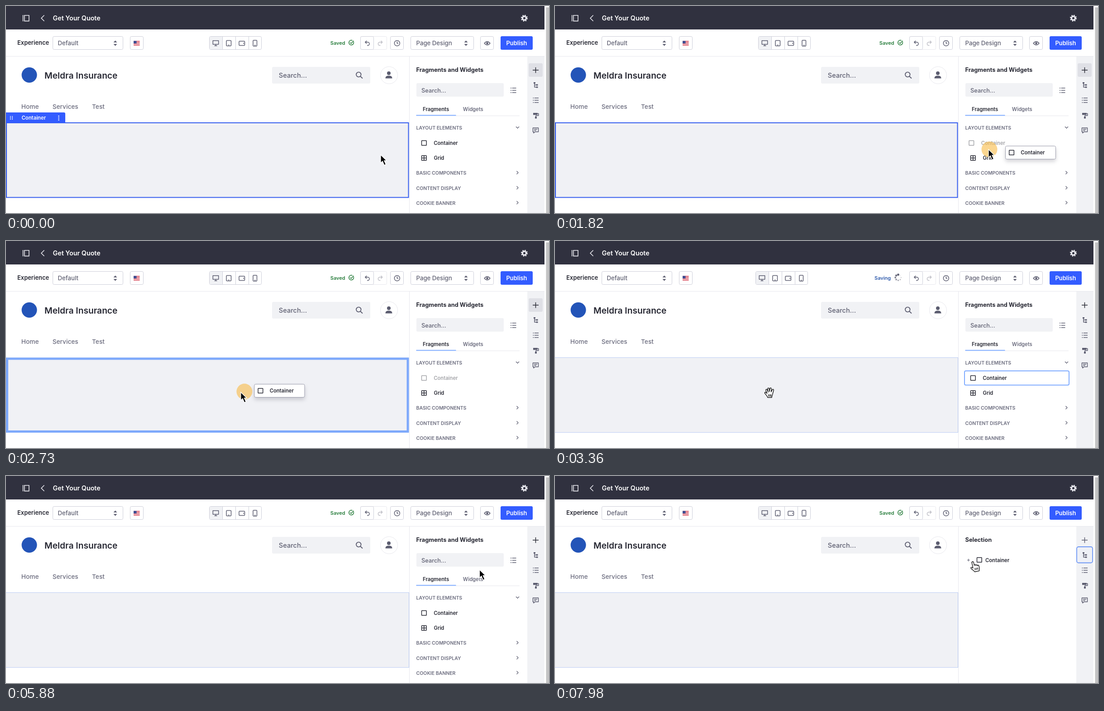
An HTML page that plays this animation: 1200x459 px, repeating every 8000 ms.

```html
<!DOCTYPE html>
<html lang="en">
<head>
<meta charset="utf-8">
<title>Page editor</title>
<style>
html, body { margin: 0; width: 100%; height: 100%; overflow: hidden; background: #fff; }
svg { display: block; }
text { font: 600 11.2px Inter, "Open Sans", sans-serif; fill: #272833; white-space: pre; }
.t13 { font-size: 12.9px; }
.reg { font-size: 13.2px; font-weight: 450; fill: #5f6072; }
.nav { font-size: 13.7px; font-weight: 500; fill: #6b6c7e; }
.cap { font-size: 10.5px; fill: #6b6c7e; }
.bold { font-size: 12.8px; font-weight: 700; }
.box { fill: #fff; stroke: #cdced9; }
.ln { fill: none; stroke: #5c5d70; stroke-width: 1.5; stroke-linejoin: round; }
.dk { stroke: #272833; }
.rule { fill: none; stroke: #e7e7ed; }
.gray { fill: #5c5d70; }
.soft { fill: #f1f2f5; }
.ptr { fill: #fff; stroke: #111; stroke-width: 1.4; stroke-linejoin: round; }
#chip rect:first-child { filter: drop-shadow(0 5px 4px rgba(40, 40, 60, .2)); }
</style>
</head>
<body>
<svg width="1200" height="459" viewBox="0 0 1200 459">
<defs>
  <path id="sort" class="gray" d="M-4-1.8H4L0-6ZM-4 1.8H4L0 6Z"/>
  <path id="chev" class="ln" d="M-2-3.5L1.5 0L-2 3.5" style="stroke-width:1.2"/>
  <path id="list" class="ln" d="M-6-5h2M-6 0h2M-6 5h2M-2.5-5h9M-2.5 0h9M-2.5 5h9"/>
  <rect id="square" class="ln dk" x="-5.3" y="-5.3" width="10.6" height="10.6" rx=".8"/>
</defs>

<!-- header -->
<rect width="1190" height="52" fill="#30313f"/>
<g fill="none" stroke="#e7e7ed" stroke-width="1.6">
  <path d="M37.6 20V34M40.8 20.8H50.8V33.4H40.8Z"/>
  <path d="M84.5 20.5L78 27L84.5 33.5"/>
</g>
<text x="103.5" y="32" style="font-size:14.3px;fill:#fff">Get Your Quote</text>
<g fill="none" stroke="#e7e7ed" transform="translate(1145.5 27)">
  <circle r="4.1" stroke-width="3.2"/>
  <circle r="6.2" stroke-width="2.8" stroke-dasharray="2.435"/>
</g>

<!-- toolbar -->
<path class="rule" d="M0 111.5H1190"/>
<text class="t13" x="25" y="86">Experience</text>
<rect class="box" x="103.5" y="67.5" width="155" height="29" rx="3"/>
<text class="reg" x="114.5" y="87">Default</text>
<use href="#sort" x="241.5" y="82.5"/>
<rect class="box" x="274.5" y="67.5" width="29" height="29" rx="3"/>
<g transform="translate(282 77.5)">
  <rect width="13.5" height="10" fill="#f6f2f4"/>
  <path d="M0 .7H13.5M0 3.5H13.5M0 6.4H13.5M0 9.3H13.5" stroke="#d8384a" stroke-width="1.4"/>
  <rect width="6.5" height="5.4" fill="#3a4c92"/>
</g>
<g id="devices">
  <rect class="box" x="449.5" y="67.5" width="115" height="29" rx="3"/>
  <rect class="soft" x="450" y="68" width="28" height="28" rx="2.5"/>
  <path d="M478.5 68V96M507.5 68V96M536.5 68V96" stroke="#cdced9"/>
  <path class="ln" d="M457.3 76.8H469.7V85H457.3ZM460.5 88.3H466.5M463.5 85V88"/>
  <rect class="ln" x="487" y="76.5" width="10.5" height="12" rx="1.5"/>
  <rect class="ln" x="515" y="78" width="12.5" height="9.5" rx="1.5"/>
  <rect class="ln" x="546" y="76" width="8.5" height="13" rx="1.5"/>
  <path class="ln" d="M491 86.4H493.6M525.2 81.5V84M549 87H551.5"/>
</g>
<g data-on="0-3010 3710-8000">
  <text x="716.8" y="86" style="font-size:11px;fill:#287d3c">Saved</text>
  <path class="ln" d="M768 79.3A5.3 5.3 0 1 1 765.5 76.5M760.3 81L762.6 83.2L768.3 77" style="stroke:#287d3c"/>
</g>
<g data-on="3010-3710">
  <text x="706" y="86" style="font-size:11px;fill:#2e5aac">Saving</text>
  <g id="spin" class="gray" transform="translate(758.5 81)"></g>
</g>
<rect class="box" x="783.5" y="67.5" width="58" height="29" rx="3" style="stroke:#e7e7ed"/>
<rect class="box" x="783.5" y="67.5" width="29" height="29" rx="3"/>
<path id="undo" class="ln" d="M797 77L793.8 80.2L797 83.4M794.3 80.2H799.5A3.6 3.6 0 0 1 799.5 87.4H798"/>
<path class="ln" opacity=".4" d="M828.5 77L831.7 80.2L828.5 83.4M831.2 80.2H826A3.6 3.6 0 0 0 826 87.4H827.5"/>
<rect class="box" x="849.5" y="67.5" width="29" height="29" rx="3"/>
<circle class="ln" cx="864.3" cy="82.5" r="6"/>
<path class="ln" d="M864.3 78.8V82.8H867"/>
<rect class="box" x="894.5" y="67.5" width="139" height="29" rx="3"/>
<text class="reg" x="906.5" y="87">Page Design</text>
<use href="#sort" x="1016.5" y="82.5"/>
<rect class="box" x="1048.5" y="67.5" width="29" height="29" rx="3"/>
<path class="ln" d="M1057.2 82.7Q1063.5 75 1069.8 82.7Q1063.5 90.4 1057.2 82.7Z"/>
<circle class="gray" cx="1063.5" cy="82.7" r="2.4"/>
<rect x="1093" y="67" width="71" height="30" rx="3" fill="#335cff"/>
<text class="t13" x="1105.5" y="87" style="fill:#fff">Publish</text>

<!-- page -->
<circle cx="51.5" cy="153" r="17" fill="#2354b8"/>
<text x="85" y="161" style="font-size:19.2px">Meldra Insurance</text>
<rect class="soft" x="588" y="135" width="217" height="37" rx="3"/>
<text class="reg" x="602.8" y="159" style="font-size:14.6px">Search...</text>
<g class="ln" style="stroke-width:1.8"><circle cx="779.3" cy="152" r="5.3"/><path d="M783.2 156L788 160.5"/></g>
<circle class="rule" cx="846.5" cy="153.5" r="19"/>
<circle class="gray" cx="846" cy="149" r="4"/>
<path class="gray" d="M838.5 160.5C838.5 156 841.5 154.5 846 154.5S853.5 156 853.5 160.5Z"/>
<text class="nav" x="33.8" y="228">Home</text>
<text class="nav" x="102.7" y="228">Services</text>
<text class="nav" x="190" y="228">Test</text>
<rect x="0" y="258" width="890" height="167" fill="#f0f1f5"/>
<g fill="none">
  <rect data-on="0-1960" x="1" y="259" width="888.5" height="165.5" stroke="#355dee" stroke-width="2"/>
  <rect data-on="1960-2940" x="2.5" y="261" width="885.5" height="161.5" stroke="#7ea9fb" stroke-width="5"/>
  <rect data-on="2940-4970 5600-8000" x="-.5" y="258.5" width="891" height="166" stroke="#bccdf4"/>
  <rect data-on="4970-5600" x=".8" y="259" width="889" height="165.4" stroke="#80acff" stroke-width="1.7"/>
</g>
<g data-on="0-1750">
  <path d="M0 236H128Q131 236 131 239V259H0Z" fill="#335cff"/>
  <path d="M9.8 244v8M14 244v8" stroke="#fff" stroke-width="1.8" stroke-dasharray="1.8 1.3"/>
  <text x="34.5" y="252" style="font-size:11.3px;fill:#fff">Container</text>
  <path d="M116.5 243v11" stroke="#fff" stroke-width="2.3" stroke-dasharray="2.3 1.9"/>
</g>

<!-- side panel -->
<path class="rule" d="M891.5 112V459"/>
<g data-on="0-6510">
  <text class="bold" x="906.5" y="146">Fragments and Widgets</text>
  <rect class="soft" x="907" y="171" width="193" height="30" rx="3"/>
  <text class="reg" x="918" y="191.5" style="font-size:12.8px">Search...</text>
  <use href="#list" x="1121" y="187"/>
  <text x="921" y="233.3" style="font-size:11.3px">Fragments</text>
  <text x="1009.8" y="233.3" style="fill:#6b6c7e">Widgets</text>
  <path class="rule" d="M994 243.5H1135"/>
  <path d="M906.5 242.5H994.5" stroke="#80acff" stroke-width="2"/>
  <text class="cap" x="906.5" y="274">LAYOUT ELEMENTS</text>
  <use href="#chev" transform="translate(1130.5 269.5) rotate(90)"/>
  <rect data-on="2940-4970" x="905" y="288" width="231" height="31.5" rx="3" fill="#fff" stroke="#80acff" stroke-width="2"/>
  <g id="item"><use href="#square" x="923.8" y="303.7"/><text x="945.3" y="307.5">Container</text></g>
  <use href="#square" x="923.8" y="337"/>
  <path class="ln dk" d="M923.8 332V342M918.8 337H928.8"/>
  <text x="945.5" y="341">Grid</text>
  <text class="cap" x="906.5" y="374.3">BASIC COMPONENTS</text>
  <text class="cap" x="906.5" y="407.7">CONTENT DISPLAY</text>
  <text class="cap" x="906.5" y="441">COOKIE BANNER</text>
  <use href="#chev" x="1130.5" y="369.5"/>
  <use href="#chev" x="1130.5" y="403"/>
  <use href="#chev" x="1130.5" y="436"/>
</g>
<g data-on="6510-8000">
  <text class="bold" x="906.5" y="146">Selection</text>
  <path class="ln" d="M910.8 186.5H916.8M913.8 183.5V189.5" style="stroke-width:1.1"/>
  <use href="#square" x="937.8" y="186"/>
  <text x="951" y="190.5">Container</text>
</g>

<!-- rail -->
<rect x="1152" y="112" width="38" height="347" fill="#f1f2f5"/>
<rect data-on="0-2940" x="1155" y="127" width="31" height="30" rx="3" fill="#dfe0e6"/>
<rect data-on="6510-8000" x="1153" y="157" width="35" height="35.5" rx="4" fill="#eef0f6" stroke="#6f98f5" stroke-width="1.8"/>
<path class="ln dk" data-on="0-6510" d="M1164 142.3H1177M1170.5 136V148.6"/>
<path class="ln" data-on="6510-8000" d="M1164 142.3H1177M1170.5 136V148.6"/>
<path class="ln" d="M1168 170V180H1172M1168 175H1172"/>
<path class="gray" d="M1166 169h4v3h-4ZM1171.5 173.4h4v3.2h-4ZM1171.5 178.4h4v3.2h-4Z"/>
<use href="#list" x="1170.5" y="209"/>
<path class="gray" d="M1165 237h9.5v4.5h-9.5ZM1169 245.5h4v4h-4Z"/>
<path class="ln" d="M1174 238.5H1176.8V243H1171V246"/>
<path class="ln" d="M1164.5 270.2H1176.5V279H1169L1166 281.8V279H1164.5ZM1167 273.2H1174M1167 276H1172"/>
<rect x="1193.5" y="3" width="6.5" height="456" fill="#c3c3c4"/>

<!-- pointer -->
<g id="chip" data-on="1750-2940">
  <rect x=".5" y=".5" width="111" height="29" rx="3" fill="#fff" stroke="#9a9bab"/>
  <use href="#square" x="14" y="15"/>
  <text x="34.3" y="18.8">Container</text>
</g>
<circle id="press" fill="#f8bd4c"/>
<g id="cursor">
  <path data-on="0-1190 1610-2940 4970-6160 7210-7700" d="M0 0V18L4.2 14.1L7.8 22.8L11.4 21.3L7.8 13H13.2Z" fill="#000" stroke="#fff" stroke-width="1.3"/>
  <path class="ptr" data-on="1190-1610 2940-4970" d="M-4 11C-5 7-10 3-10.5 1c-.3-2 2-2.4 3.2-.8L-5.5 2L-8-5c-.6-2.4 2.4-3 3.2-.8L-3-1L-4-8c-.3-2.6 3-2.9 3.3-.4L0-2L.8-8.5c.3-2.5 3.4-2.2 3.3.3L3.8-1.5L6-6c1-2.2 3.9-1 3.1 1.2L7 3C6.3 7 5 8 5 11ZM-2 4V9M.8 4V9M3.4 4V9"/>
  <path class="ptr" data-on="6160-7210 7700-8000" transform="rotate(-12)" d="M-2 1a2 2 0 0 1 4 0V8c0-2 3.4-2 3.4 0v1c0-2 3.4-2 3.4.3v1c0-1.8 3-1.5 3 .6V15c0 4-1.6 4.5-1.6 7H0C-1 19-5.5 15-6.5 12.5c-.6-2 1.8-2.6 3-1L-2 13ZM2 14V18.5M5 14V18.5M8 14V18.5"/>
</g>
</svg>
<script>
const LOOP = 8000, STEP = 70;
const $ = id => document.getElementById(id);

// Tracks: [time, x, y]
const cursorPath = [
  [0, 828, 330], [420, 850, 326], [1190, 952, 305], [1540, 953, 305], [1820, 958, 318],
  [2310, 725, 331], [2940, 474, 336], [4900, 474, 336], [5110, 560, 317],
  [5600, 895, 240], [6300, 1181, 180], [6650, 1183, 182], [7000, 1183, 182], [7980, 923, 191]
];
const chipPath = [[1750, 994, 309], [1820, 995, 310], [2310, 735, 313], [2940, 510, 318]];
const pressPath = [
  [1540, 953, 305], [1820, 960, 318], [2310, 750, 328], [2940, 476, 335],
  [6440, 1178, 177], [6650, 1179, 177]
];

// Monotone cubic through the keys: eases at rests, never overshoots.
function at(path, t) {
  const n = path.length - 1;
  if (t <= path[0][0]) return path[0].slice(1);
  if (t >= path[n][0]) return path[n].slice(1);
  const i = path.findIndex(k => k[0] > t) - 1;
  const h = path[i + 1][0] - path[i][0], u = (t - path[i][0]) / h;
  return [1, 2].map(d => {
    const slope = j => j < 0 || j >= n ? 0 : (path[j + 1][d] - path[j][d]) / (path[j + 1][0] - path[j][0]);
    const tangent = j => {
      const a = slope(j - 1), b = slope(j);
      return a * b > 0 ? 2 * a * b / (a + b) : 0;
    };
    const p = path[i][d], q = path[i + 1][d], v = 1 - u;
    return p * (1 + 2 * u) * v * v + tangent(i) * h * u * v * v
      + q * u * u * (3 - 2 * u) - tangent(i + 1) * h * u * u * v;
  });
}

const clamp = x => Math.max(0, Math.min(1, x));
const pulse = (t, from, to) => Math.min(clamp((t - from) / 140), clamp((to - t) / 210));
const place = (el, p) => el.setAttribute("transform", `translate(${p[0].toFixed(2)} ${p[1].toFixed(2)})`);

const timed = [...document.querySelectorAll("[data-on]")].map(el => ({
  el, spans: el.dataset.on.split(" ").map(s => s.split("-").map(Number))
}));

const dots = Array.from({ length: 8 }, (_, i) => {
  const dot = document.createElementNS("http://www.w3.org/2000/svg", "circle");
  const a = i * Math.PI / 4;
  dot.setAttribute("cx", 6.3 * Math.sin(a));
  dot.setAttribute("cy", -6.3 * Math.cos(a));
  return $("spin").appendChild(dot);
});

function render(t) {
  for (const { el, spans } of timed)
    el.style.display = spans.some(([a, b]) => t >= a && t < b) ? "" : "none";

  place($("cursor"), at(cursorPath, t));
  place($("chip"), at(chipPath, t));
  place($("press"), at(pressPath, t));
  const size = Math.max(pulse(t, 1470, 3080), pulse(t, 6400, 6790));
  $("press").setAttribute("r", 17.5 * size);
  $("press").style.opacity = .62 * size;

  const pulled = t >= 1540 && t < 1890;
  place($("item"), [pulled ? -3.5 : 0, 0]);
  $("item").style.opacity = t >= 1680 && t < 2940 ? .42 : 1;
  place($("devices"), [t >= 3010 && t < 3710 ? -6 : 0, 0]);

  const head = Math.floor((t - 3360) / STEP);
  dots.forEach((dot, i) => {
    const age = (((head - i) % 8) + 8) % 8;
    dot.setAttribute("r", 2.4 - age * .18);
    dot.style.opacity = 1 - age * .12;
  });
}

const start = performance.now();
function tick() {
  const t = (performance.now() - start) % LOOP;
  render(Math.floor(t / STEP) * STEP);
  requestAnimationFrame(tick);
}
tick();
</script>
</body>
</html>
```
